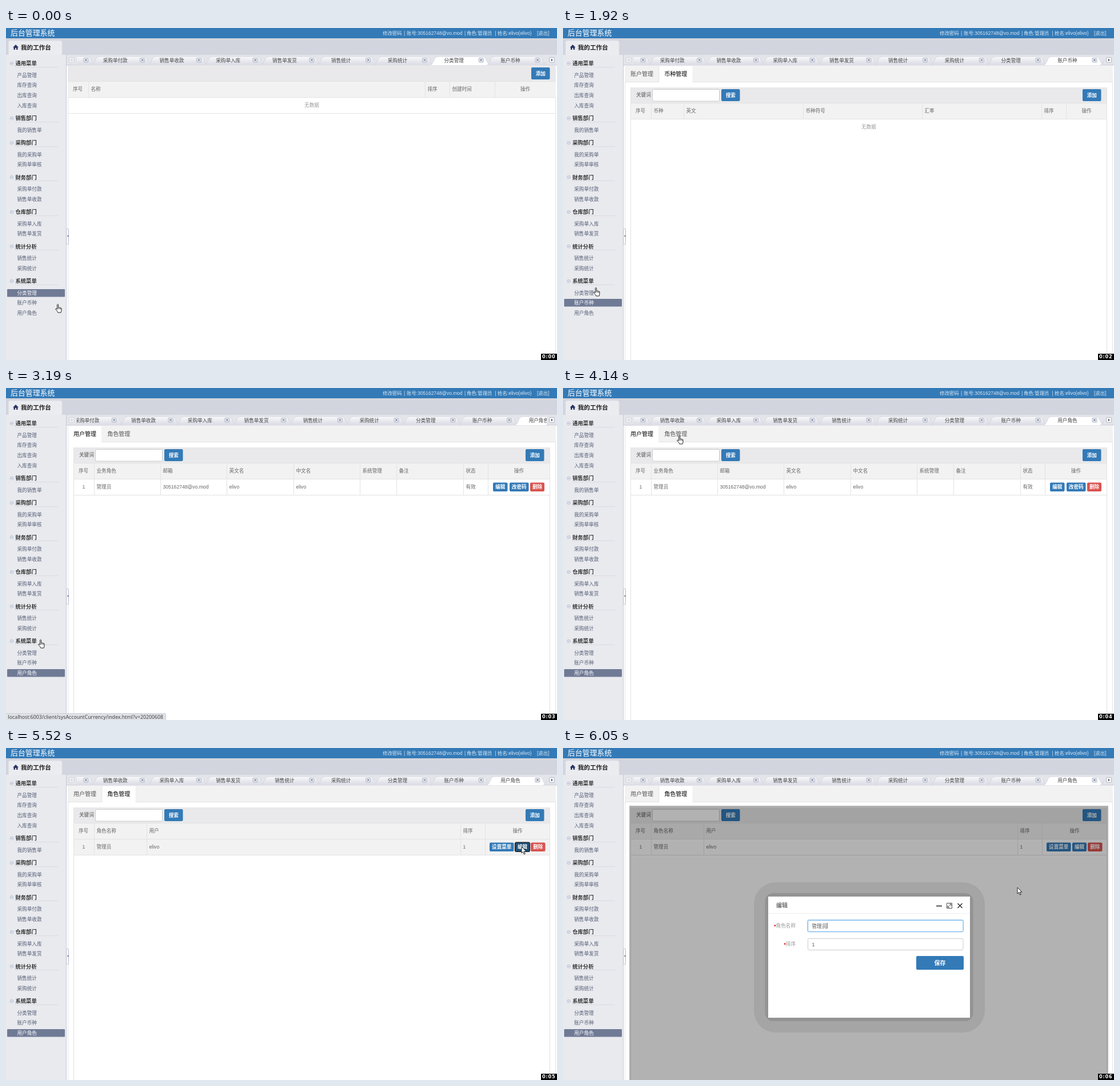
These frames come from a looping animation (964x581 px, 6.15 s). An HTML page with a canvas:

```html
<!DOCTYPE html>
<html lang="zh-CN">
<head>
<meta charset="utf-8">
<style>
html, body { margin: 0; width: 100%; height: 100%; overflow: hidden; background: #fff; }
canvas { display: block; }
</style>
</head>
<body>
<canvas id="stage" width="964" height="581"></canvas>
<script>
const ctx = document.getElementById('stage').getContext('2d');
const LOOP = 6150, BLUE = '#337ab7', RED = '#d9534f', BAND = '#d3d5de', LINE = '#e3e3e3';
const SANS = '"Liberation Sans","Noto Sans CJK SC","Noto Sans CJK",sans-serif';
const USER = 'elivo', MAIL = '305162748@vo.mod';

// The screen is sampled at these times (ms).
const STEPS = [0, 210, 430, 640, 850, 1070, 1280, 1490, 1700, 1920, 2130, 2340, 2550, 2760, 2970, 3190,
  3410, 3620, 3720, 3930, 4140, 4350, 4560, 4770, 4980, 5190, 5310, 5520, 5730, 5940, 6050];

// Pointer path: time, x, y
const PATH = [[0, 90, 483], [210, 58, 479], [430, 55, 479], [640, 76, 417], [850, 197, 228], [1070, 198, 95],
  [1280, 197, 80], [1490, 196, 82], [1920, 57, 454], [2130, 50, 492], [2550, 49, 495], [2760, 49, 480],
  [3190, 60, 440], [3930, 200, 95], [4140, 203, 83], [4560, 200, 82], [5310, 890, 178], [5520, 902, 173],
  [5730, 895, 180], [6050, 795, 244]];

const MENU = [
  ['通用菜单', '产品管理', '库存查询', '出库查询', '入库查询'],
  ['销售部门', '我的销售单'],
  ['采购部门', '我的采购单', '采购单审核'],
  ['财务部门', '采购单付款', '销售单收款'],
  ['仓库部门', '采购单入库', '销售单发货'],
  ['统计分析', '销售统计', '采购统计'],
  ['系统菜单', '分类管理', '账户币种', '用户角色']];
const TABS = ['采购单付款', '销售单收款', '采购单入库', '销售单发货', '销售统计', '采购统计', '分类管理', '账户币种', '用户角色'];
const TAB_STEP = 98.75;

const VIEWS = {
  category: { lines: [144, 733, 776, 855], heads: ['名称', '排序', '创建时间'] },
  account: { tabs: ['账户管理', '币种管理'], open: 0, lines: [154, 225, 347, 469, 591, 713, 835, 879],
    heads: ['账户类型', '账户姓名', '账户银行', '账户卡号', '开户地址', '账户备注', '排序'] },
  currency: { tabs: ['账户管理', '币种管理'], open: 1, lines: [154, 211, 420, 628, 837, 880],
    heads: ['币种', '英文', '币种符号', '汇率', '排序'], empty: true },
  loading: { tabs: ['用户管理', '角色管理'], open: 0 },
  users: { tabs: ['用户管理', '角色管理'], open: 0, lines: [154, 270, 386, 503, 619, 683, 800, 843],
    heads: ['业务角色', '邮箱', '英文名', '中文名', '系统管理', '备注', '状态'],
    row: ['管理员', MAIL, USER, USER, '', '', '有效'],
    buttons: [['编辑', 852, 25.5], ['改密码', 881, 33.5], ['删除', 917, 25, RED]] },
  roles: { tabs: ['用户管理', '角色管理'], open: 1, lines: [154, 246, 795, 838],
    heads: ['角色名称', '用户', '排序'], row: ['管理员', USER, '1'],
    buttons: [['设置菜单', 846, 42.5], ['编辑', 891, 25], ['删除', 918, 25.5, RED]] }
};

const HAND = new Path2D('M-.4 1Q.6-.6 1.6 1V6Q2.6 5 3.6 6.4Q4.6 5.6 5.5 7Q6.5 6.4 7 7.8V11Q7 13 6 15H.9Q0 12.4-3 9.6Q-3.6 7.6-1.8 8L-.4 9.4Z');
const ARROW = new Path2D('M0 0V11L2.6 8.6L4.4 13L6.3 12.2L4.4 8H8Z');

function rect(x, y, w, h, fill) {
  ctx.fillStyle = fill;
  ctx.fillRect(x, y, w, h);
}

function box(x, y, w, h, fill, stroke, radius = 2) {
  ctx.beginPath();
  ctx.roundRect(x, y, w, h, radius);
  if (fill) { ctx.fillStyle = fill; ctx.fill(); }
  if (stroke) { ctx.strokeStyle = stroke; ctx.lineWidth = 1; ctx.stroke(); }
}

function stroke(d, color, width = 1) {
  ctx.strokeStyle = color;
  ctx.lineWidth = width;
  ctx.stroke(new Path2D(d));
}

// y is the vertical middle of the glyphs
function text(str, x, y, { size = 8.6, color = '#666', weight = '', align = 'left', family = SANS } = {}) {
  ctx.font = `${weight} ${size}px ${family}`;
  ctx.textAlign = align;
  ctx.fillStyle = color;
  ctx.fillText(str, x, y + size * 0.37);
}

function button(label, x, y, w, h, fill = BLUE, size = 8.6) {
  box(x, y, w, h, fill);
  text(label, x + w / 2, y + h / 2, { size, color: '#fff', weight: 'bold', align: 'center' });
}

function pointerAt(t) {
  const next = PATH.findIndex(p => p[0] > t);
  if (next < 0) return PATH.at(-1).slice(1);
  const [t0, x0, y0] = PATH[next - 1], [t1, x1, y1] = PATH[next];
  const k = (t - t0) / (t1 - t0);
  return [x0 + (x1 - x0) * k, y0 + (y1 - y0) * k];
}

function drawHeader() {
  rect(0, 0, 964, 18, BLUE);
  text('后台管理系统', 8, 8, { size: 12.9, color: '#fff' });
  const pale = { size: 8.45, color: '#dce8f3' };
  [['修改密码', 659], ['|', 696], ['账号:' + MAIL, 701], ['|', 802], ['角色:管理员', 806], ['|', 855.5],
    [`姓名:${USER}(${USER})`, 860], ['[退出]', 929]].forEach(([s, x]) => text(s, x, 8.5, pale));
  rect(0, 18, 964, 47, BAND);
  box(4.5, 22, 93.5, 28, '#ebecf0', '#dfe1e8', 3);
  ctx.fillStyle = '#2b3563';
  ctx.fill(new Path2D('M12 34L17 29L22 34H20.5V38H18V35H16V38H13.5V34Z'));
  text('我的工作台', 26, 34, { size: 10.6, color: '#222', weight: 'bold' });
}

function drawSidebar(selected, [px, py]) {
  rect(0, 47, 105, 534, '#e9eaee');
  rect(105, 47, 1, 534, '#c6cad6');
  let y = 62;
  for (const [title, ...items] of MENU) {
    box(7.5, Math.round(y) - 2.5, 5, 5, '#f4f6fa', '#b4bfd2', 1);
    rect(8.5, Math.round(y) - .5, 3, 1, '#7c8bab');
    text(title, 16.5, y, { size: 9.3, color: '#333', weight: 'bold' });
    rect(16, Math.round(y) + 6, 75, 1, '#d9dbe2');
    y += 20.6;
    for (const item of items) {
      const on = item === selected, hover = px < 65 && Math.abs(py - y) < 7;
      if (on) box(2, Math.round(y) - 7, 101, 13.5, '#6f7a95', null, 1);
      text(item, 19.5, y, { color: on ? '#fff' : hover ? '#2a2ad0' : '#535d75' });
      y += 17.65;
    }
    y += 4.65;
  }
}

function drawTabs(selected, shift) {
  rect(106, 47, 858, 19, '#e4e5eb');
  rect(106, 64, 858, 1, '#d3d5de');
  ctx.save();
  ctx.beginPath();
  ctx.rect(124, 47, 822, 19);
  ctx.clip();
  const shade = ctx.createLinearGradient(0, 50, 0, 64);
  shade.addColorStop(0, '#f8f8fa');
  shade.addColorStop(1, '#dcdde5');
  for (let i = -1; i < TABS.length + 1; i++) {
    const label = TABS[i] || '', x = 191.2 + i * TAB_STEP - shift, on = label === selected;
    const shape = `M${x - 41} 65Q${x - 37} 63 ${x - 34} 54Q${x - 32} 50 ${x - 28} 50H${x + 50}Q${x + 54} 50 ${x + 56} 54Q${x + 59} 63 ${x + 63} 65`;
    ctx.fillStyle = on ? '#fff' : shade;
    ctx.fill(new Path2D(shape));
    stroke(shape, '#cfd2da', 0.8);
    text(label, x, 57, { align: 'center', color: '#444' });
    const c = x + 47.5;
    box(c - 4, 52.5, 8, 7.5, '#eef0f5', '#aeb5c6', 1);
    stroke(`M${c - 2} 54.2l4 4m0-4l-4 4`, '#59637c');
  }
  ctx.restore();
  box(110.5, 51.5, 9, 9, '#ecedf1', '#d3d6de', 1);
  box(950.5, 51.5, 9, 9, '#f2f3f6', '#b3bacb', 1);
  ctx.fillStyle = '#c4c8d2';
  ctx.fill(new Path2D('M116 54v4l-2.5-2z'));
  ctx.fillStyle = '#333';
  ctx.fill(new Path2D('M954 54v4l2.5-2z'));
}

function drawTable(view, left, right, top, hover, pressed) {
  rect(left, top - 27, right - left, 27, '#e9e9eb');
  rect(left, top, right - left, 28, '#f2f2f2');
  if (view.row) {
    if (hover) rect(left, top + 28, right - left, 28, '#f2f2f2');
    rect(left, top + 56, right - left, 1, LINE);
  }
  rect(left, top, right - left, 1, LINE);
  rect(left, top + 28, right - left, 1, LINE);
  for (const x of view.lines) rect(x, top, 1, view.row ? 56 : 28, LINE);
  const y = top + 13.5;
  text('序号', left + 9, y);
  view.heads.forEach((head, i) => text(head, view.lines[i] + 4.5, y));
  text('操作', (view.lines.at(-1) + right) / 2, y, { align: 'center' });
  if (!view.row) return;
  text('1', left + 18, y + 28, { align: 'center' });
  view.row.forEach((cell, i) => text(cell, view.lines[i] + 4.5, y + 28));
  view.buttons.forEach(([label, x, w, color], i) => {
    const down = pressed && i === 1;
    if (down) box(x - 1, 164.5, w + 2, 17.5, '#111', null, 3);
    button(label, x, 165.5, w, 15.5, down ? '#204d74' : color);
  });
}

function drawContent(view, py, pressed) {
  rect(106, 66, 858, 515, '#fff');
  rect(108, 66, 1, 515, LINE);
  rect(961, 66, 1, 515, LINE);
  if (!view.tabs) {
    drawTable(view, 108, 962, 93);
    button('添加', 919, 69, 32.5, 21);
    rect(108, 149, 854, 1, LINE);
    text('无数据', 535, 135, { align: 'center', color: '#999' });
    return;
  }
  rect(108, 66, 854, 29, '#f2f2f2');
  rect(108, 94, 854, 1, LINE);
  view.tabs.forEach((label, i) => {
    const x = 108 + i * 59.3, on = i === view.open;
    if (on) {
      rect(x, 67, 60, 28, LINE);
      rect(x + 1, 67, 58.5, 28, '#fff');
    }
    text(label, x + 30, 80.5, { size: 10, align: 'center', color: on ? '#000' : '#555' });
  });
  if (!view.lines) return;
  drawTable(view, 118, 952, 131, py > 159 && py < 187, pressed);
  rect(118, 104, 1, 477, LINE);
  rect(951, 104, 1, 477, LINE);
  text('关键词', 128, 117, { color: '#555' });
  box(156.5, 107.5, 117, 20.5, '#fff', '#ccc');
  button('搜索', 277, 107, 32.5, 21);
  button('添加', 909, 107, 32.5, 21);
  if (view.empty) text('无数据', 535, 173, { align: 'center', color: '#999' });
}

function drawDialog() {
  rect(116, 101, 838, 480, 'rgba(0,0,0,.3)');
  box(334, 235, 404, 263, 'rgba(0,0,0,.07)', null, 38);
  box(353.5, 254, 364, 224, 'rgba(0,0,0,.11)', null, 14);
  rect(359, 260, 353, 212, '#fff');
  rect(359, 289, 353, 1, '#eee');
  text('编辑', 373, 275, { size: 10, color: '#333' });
  stroke('M653 276.5h10M690.5 272l8 8m0-8l-8 8', '#222', 1.3);
  stroke('M671.5 271.5h9v9h-9zM673 279l6-6m-3 0h3v3M673 276v3h3', '#444', 0.9);
  [['角色名称', 301, '管理员'], ['排序', 333, '1']].forEach(([label, y, value], i) => {
    text(label, 407, y + 10, { align: 'right', color: '#999' });
    text('*', 407 - label.length * 8.6, y + 11, { align: 'right', color: '#e00', weight: 'bold' });
    if (!i) box(426.5, y - 1.5, 275, 23, '#d5e8f8', null, 4);
    box(428.5, y + .5, 271.5, 20, '#fff', i ? '#ccc' : '#66afe9');
    text(value, 435.5, y + 10.5, { color: '#555' });
  });
  rect(461.5, 306, 1, 10, '#333');
  button('保存', 618, 364, 83, 24, BLUE, 10);
}

function drawStatus(page) {
  const url = `localhost:6003/client/${page}/index.html?v=20200608`;
  const style = { size: 8.75, color: '#444', family: '"Noto Sans",sans-serif' };
  ctx.font = `${style.size}px ${style.family}`;
  box(-2, 569.5, ctx.measureText(url).width + 10, 14, '#dee1e6', '#cfd2d8');
  text(url, 3.5, 576, style);
}

function drawTimer(seconds) {
  rect(936, 570, 28, 11, '#000');
  ctx.letterSpacing = '0.8px';
  text('0:0' + seconds, 938, 575.3, { size: 8.2, color: '#fff', weight: 'bold', family: '"DejaVu Sans",sans-serif' });
  ctx.letterSpacing = '0px';
}

function drawPointer([x, y], hand) {
  ctx.save();
  ctx.translate(x, y);
  const shape = hand ? HAND : ARROW;
  ctx.fillStyle = '#fff';
  ctx.fill(shape);
  ctx.strokeStyle = '#222';
  ctx.lineWidth = 1;
  ctx.stroke(shape);
  if (hand) stroke('M1.6 6v3M3.6 6.4v2.8M5.5 7v2.4', '#222', 0.8);
  ctx.restore();
}

function draw(t) {
  const name = t < 430 ? 'category' : t < 1490 ? 'account' : t < 2550 ? 'currency'
    : t < 3190 ? 'loading' : t < 4560 ? 'users' : 'roles';
  const selected = t < 430 ? '分类管理' : t < 2550 ? '账户币种' : '用户角色';
  const shift = TAB_STEP * Math.min(1, Math.max(0, (t - 2970) / 440));
  const pointer = pointerAt(t), [px, py] = pointer;
  const dialog = t >= 5730;
  const hand = px < 100 || (py < 96 && px < 230);

  drawHeader();
  drawSidebar(selected, pointer);
  drawTabs(selected, shift);
  drawContent(VIEWS[name], py, t >= 5520 && !dialog);
  box(105.5, 351.5, 4, 27, '#fff', '#b4bbcb', 1);
  ctx.fillStyle = '#444';
  ctx.fill(new Path2D('M109 362.5v3l-2-1.5z'));
  if (dialog) drawDialog();
  if (t >= 640 && t < 1280) drawStatus('buysStatistics');
  if (t >= 2760 && t < 3410) drawStatus('sysAccountCurrency');
  drawTimer([850, 1920, 2760, 3720, 4770, 5730].filter(s => t >= s).length);
  drawPointer(pointer, hand);
}

function tick() {
  const now = performance.now() % LOOP;
  draw(STEPS.findLast(s => s <= now));
  requestAnimationFrame(tick);
}
tick();
</script>
</body>
</html>
```
